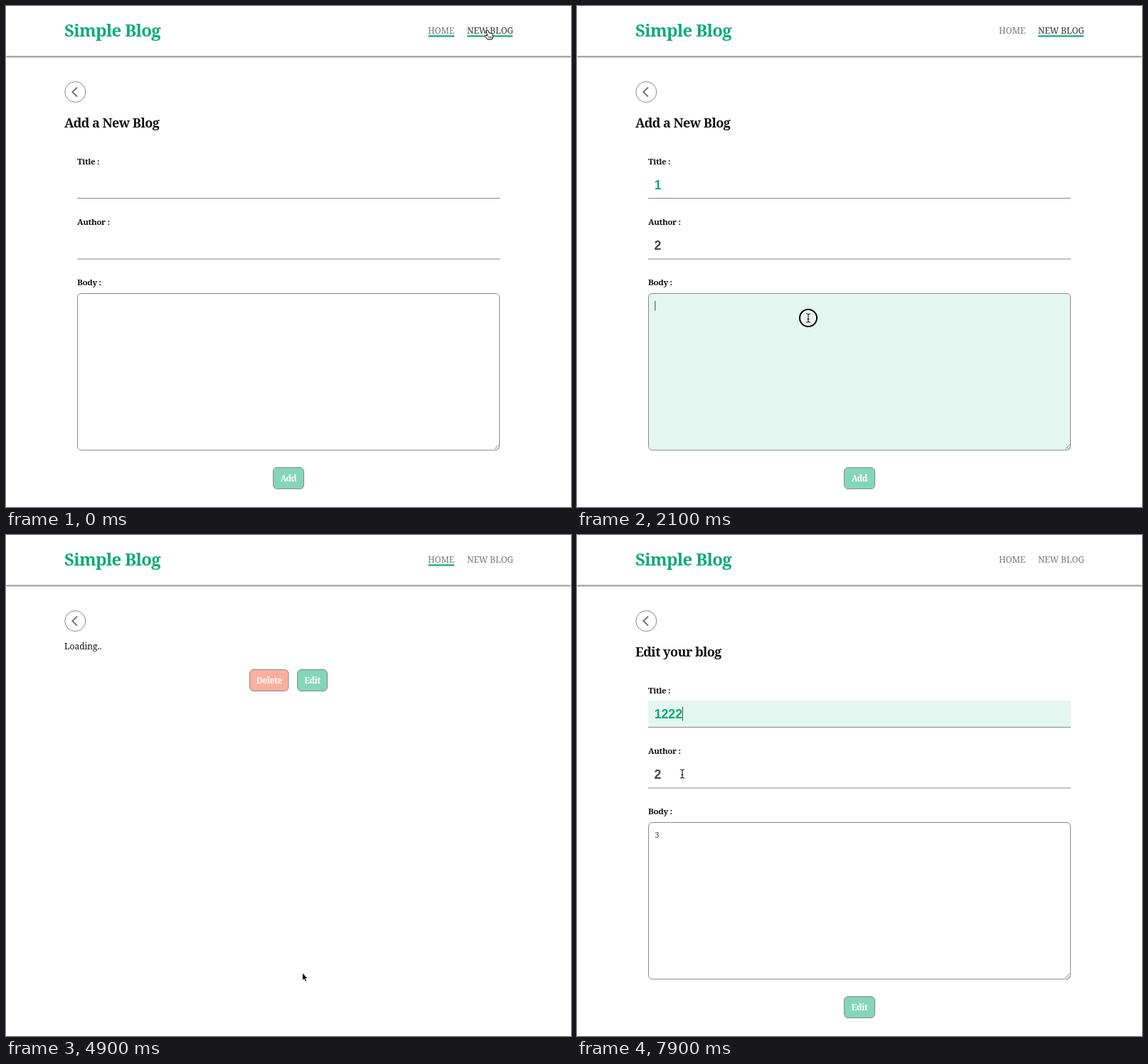
An HTML page for the animation above (8000 ms loop, 794 by 705 pixels).

```html
<!DOCTYPE html>
<html lang="en">
<head>
<meta charset="utf-8">
<title>Simple Blog</title>
<style>
  html, body { margin: 0; width: 100%; height: 100%; overflow: hidden; background: #fff; }
  svg { display: block; }
  text { font-family: 'Roboto Slab', 'Noto Serif', serif; font-size: 12px; fill: #111; white-space: pre; }
  .bold { font-weight: 700; letter-spacing: -.03em; }
  .logo { font-size: 24px; fill: #0cab75; }
  .head { font-size: 18px; }
  .label { font-size: 11.6px; }
  .nav { font-weight: 500; }
  .btn { font-size: 11.7px; fill: #fff; text-anchor: middle; }
  .input { font: 700 17.7px 'Liberation Sans', Arial, sans-serif; fill: #444; }
  .area { font-size: 10.5px; font-weight: 500; fill: #333; }
  .by { font-style: italic; fill: #777; }
  .date { font-size: 8px; fill: #777; }
  .option { font: 500 9.7px Inter, sans-serif; fill: #fff; }
  .green { fill: #0cab75; }
</style>
</head>
<body>
<script>
const LOOP = 8000;
const GREEN = '#0cab75', TINT = '#e3f6f0', LINE = '#888';
const NS = 'http://www.w3.org/2000/svg';

function el(parent, tag, attrs = {}) {
  const node = document.createElementNS(NS, tag);
  set(node, attrs);
  parent.appendChild(node);
  return node;
}
function set(node, attrs) {
  for (const key in attrs) node.setAttribute(key, attrs[key]);
}
function text(parent, x, y, cls, str) {
  const node = el(parent, 'text', { x, y, class: cls });
  node.textContent = str;
  return node;
}
function rect(parent, x, y, width, height, fill, more = {}) {
  return el(parent, 'rect', { x, y, width, height, fill, ...more });
}
function line(parent, d, stroke, width = 1) {
  return el(parent, 'path', { d, stroke, 'stroke-width': width, fill: 'none' });
}
function button(parent, x, y, w, fill, label) {
  const g = el(parent, 'g');
  const box = rect(g, x, y, w, 30, fill, { rx: 5.5, stroke: LINE });
  const caption = text(g, x + w / 2, y + 19.3, 'btn bold', label);
  return { g, box, caption };
}
function show(node, on) {
  node.style.display = on ? '' : 'none';
}

const svg = el(document.body, 'svg', { width: 794, height: 705, viewBox: '0 0 794 705' });

// Header
const header = rect(svg, 0, -10, 794, 80.5, '#fff');
header.style.filter = 'drop-shadow(0 1px 1.3px rgba(0,0,0,.75))';
text(svg, 82, 42.5, 'logo bold', 'Simple Blog');
const home = text(svg, 593, 38.5, 'nav', 'HOME');
const fresh = text(svg, 648, 38.5, 'nav', 'NEW BLOG');
const homeBar = rect(svg, 593.5, 41.3, 36.5, 2.2, GREEN);
const freshBar = rect(svg, 648, 41.3, 64, 2.2, GREEN);

// Back button
const back = el(svg, 'g');
el(back, 'circle', { cx: 97.3, cy: 121, r: 14.5, fill: '#fff', stroke: LINE });
line(back, 'M100 114.5L93.3 121L100 127.5', '#777', 2);

// Form page
const form = el(svg, 'g');
const heading = text(form, 82, 170.5, 'head bold', '');
text(form, 100, 222.7, 'label bold', 'Title :');
text(form, 100, 307.7, 'label bold', 'Author :');
text(form, 100, 393.3, 'label bold', 'Body :');
const titleBox = rect(form, 100, 233, 594, 37, '#fff');
const authorBox = rect(form, 100, 318.5, 594, 37.5, '#fff');
line(form, 'M100 270.5H694M100 356H694', LINE);
const bodyBox = rect(form, 100.5, 404.5, 593, 220.5, '#fff', { rx: 5.5, stroke: LINE });
line(form, 'M686.5 623.5L692.5 617.5M690 623.5L692.5 621', '#777', .9);
const titleText = text(form, 108.7, 257.8, 'input green', '');
const authorText = text(form, 108.4, 343, 'input', '');
const bodyText = text(form, 109.5, 425.5, 'area', '');
const caret = rect(form, 0, 0, 1, 20, '#444');
const submit = button(form, 375.5, 649.5, 43, '#84d6b9', 'Add');

// Suggestions below the author field
const menu = el(form, 'g');
rect(menu, 100, 358, 141.5, 144, '#262b2d', { rx: 2.5 })
  .style.filter = 'drop-shadow(0 1px 1.5px rgba(0,0,0,.35))';
['Tav', 'tav', 'asefd', 'Sela, Nori', 'Orlen'].forEach((name, i) =>
  text(menu, 108.7, 380.5 + i * 26.55, 'option', name));

// List page
const list = el(svg, 'g');
const cards = [['asefd', 'Tav'], ['asefd', 'Orlen'], ['asefd', 'tav'], ['1', '2']].map(([name, author], i) => {
  const y = 148.5 + i * 140;
  const box = rect(list, 83, y, 628.5, 116, '#fff', { rx: 11.5, stroke: LINE });
  text(list, 100, y + 38, 'head bold green', name);
  text(list, 101, y + 69, 'by', 'Written by ' + author);
  return box;
});

// Detail page
const detail = el(svg, 'g');
const loading = text(detail, 82, 161, '', 'Loading..');
const post = el(detail, 'g');
rect(post, 83, 148.3, 628.5, 147.2, TINT, { rx: 11.5, stroke: LINE });
text(post, 100, 186.3, 'head bold green', '1');
text(post, 101, 217.7, 'by', 'Written by 2');
text(post, 100.3, 243, 'date', '16/04/2021, 04:44:04');
text(post, 100.5, 270, '', '3');
const actions = el(detail, 'g');
button(actions, 342.5, 189.5, 54.5, '#fab09e', 'Delete');
const edit = button(actions, 409.5, 189.5, 42, '#84d6b9', 'Edit');

// Pointer and click ring
const ring = el(svg, 'g', { fill: 'none' });
const halo = el(ring, 'circle', { stroke: '#fff', 'stroke-width': 1.4 });
const hoop = el(ring, 'circle', { stroke: '#000', 'stroke-width': 2 });
const pointer = el(svg, 'g');
const shapes = { hand: el(pointer, 'g'), beam: el(pointer, 'g'), arrow: el(pointer, 'g') };
el(shapes.hand, 'path', {
  d: 'M-1.2 .3Q.4 -.8 1.1 .8L2 4Q3.2 3.3 3.9 4.4Q5.1 3.9 5.7 5.1Q7 4.9 7.2 6.4V9.4L6 13H-.2L-4 8.4Q-3.6 6.5 -1.5 7.3L-.5 8.2L-1.9 2Q-2 .8 -1.2 .3Z',
  fill: '#fff', stroke: '#000', 'stroke-width': 1, 'stroke-linejoin': 'round'
});
line(shapes.hand, 'M1.6 8.5V11.2M3.3 8.5V11.2M5 8.5V11.2', '#000', .7);
line(shapes.beam, 'M-3 -6Q0 -6 0 -4.5Q0 -6 3 -6M0 -4.5V4.5M-3 6Q0 6 0 4.5Q0 6 3 6M-1.5 1.5H1.5', '#fff', 2.4);
line(shapes.beam, 'M-3 -6Q0 -6 0 -4.5Q0 -6 3 -6M0 -4.5V4.5M-3 6Q0 6 0 4.5Q0 6 3 6M-1.5 1.5H1.5', '#111', 1.1);
el(shapes.arrow, 'path', {
  d: 'M0 0V11L2.5 8.7L4.2 12.6L6 11.8L4.4 8H7.6Z',
  fill: '#000', stroke: '#fff', 'stroke-width': .8
});

// [start, end, x, y]
const moves = [
  [0, 0, 677, 34], [500, 680, 300, 252], [1150, 1330, 309, 340], [1920, 2050, 325, 439],
  [2400, 2600, 402, 697], [2800, 3000, 401.5, 671], [3900, 4400, 416.5, 616],
  [5650, 5890, 431.5, 338], [6250, 6500, 148, 265], [7650, 7850, 148, 336]
];
const kinds = [
  [0, 'hand'], [530, 'arrow'], [630, 'beam'], [2520, 'arrow'], [2900, 'hand'], [3300, 'arrow'],
  [4050, 'hand'], [4800, 'arrow'], [5860, 'hand'], [6250, 'arrow'], [6430, 'beam']
];
const pages = [[0, 'new'], [3300, 'list'], [4800, 'detail'], [6250, 'edit']];
const focus = [
  [0, ''], [690, 'title'], [1350, 'author'], [2065, 'body'], [3020, ''], [6600, 'title']
];
const titles = [[0, ''], [1100, '1'], [7300, '12'], [7450, '122'], [7600, '1222']];
const clicks = [690, 1350, 2065, 3020, 4560, 5920, 6600];

const at = (steps, t) => steps.reduce((v, s) => (t >= s[0] ? s[1] : v), steps[0][1]);
const part = (t, a, b) => Math.min(1, Math.max(0, (t - a) / (b - a)));
const ease = k => k * k * (3 - 2 * k);

function place(t) {
  let [, , x, y] = moves[0];
  for (const [a, b, nx, ny] of moves.slice(1)) {
    const k = ease(part(t, a, b));
    x += (nx - x) * k;
    y += (ny - y) * k;
  }
  return [x, y];
}

function drawForm(t, page) {
  const field = at(focus, t);
  const title = at(titles, t);
  heading.textContent = page === 'new' ? 'Add a New Blog' : 'Edit your blog';
  titleText.textContent = title;
  authorText.textContent = t >= 1800 ? '2' : '';
  bodyText.textContent = t >= 2250 ? '3' : '';
  set(titleBox, { fill: field === 'title' ? TINT : '#fff' });
  set(authorBox, { fill: field === 'author' ? TINT : '#fff' });
  set(bodyBox, { fill: field === 'body' ? TINT : '#fff' });
  show(menu, t >= 1400 && t < 1800);
  show(caret, field !== '');
  if (field === 'title') set(caret, { x: 108.5 + title.length * 9.84, y: 241.5, height: 20 });
  if (field === 'author') set(caret, { x: t < 1800 ? 108.5 : 118.5, y: 327, height: 20 });
  if (field === 'body') set(caret, { x: t < 2250 ? 109.3 : 116, y: 415, height: 13.5 });
  const hot = t >= 2900 && t < 3300;
  set(submit.box, { fill: hot ? '#0cab75' : '#84d6b9', stroke: hot ? '#1b6f8c' : LINE, rx: hot ? 3 : 5.5 });
  submit.caption.textContent = page === 'new' ? 'Add' : 'Edit';
}

function draw(t) {
  const page = at(pages, t);
  const isForm = page === 'new' || page === 'edit';
  show(form, isForm);
  show(list, page === 'list' && t >= 3500);
  show(detail, page === 'detail');
  show(back, page !== 'list');
  if (isForm) drawForm(t, page);

  const loaded = t >= 5200;
  show(loading, !loaded);
  show(post, loaded);
  set(actions, { transform: `translate(0 ${loaded ? 130.8 : 0})` });
  set(edit.box, { fill: t >= 5860 ? GREEN : '#84d6b9' });
  set(cards[3], { fill: t >= 4050 ? TINT : '#fff' });

  home.style.fill = page === 'list' ? '#333' : '#777';
  fresh.style.fill = page === 'new' ? '#333' : '#777';
  const homeOn = 1 - ease(part(t, 500, 880)) + ease(part(t, 3300, 3720)) - ease(part(t, 4920, 5400));
  set(homeBar, { width: 36.5 * homeOn });
  set(freshBar, { width: 64 * (1 - ease(part(t, 3300, 3720))) });

  const [x, y] = place(t);
  const kind = at(kinds, t);
  for (const name in shapes) show(shapes[name], name === kind);
  set(pointer, { transform: `translate(${x} ${y})` });

  const click = clicks.find(c => t >= c && t < c + 210);
  show(ring, click !== undefined);
  if (click !== undefined) {
    const r = 9 + 12.5 * part(t, click, click + 150);
    set(ring, { transform: `translate(${x} ${y})` });
    set(hoop, { r });
    set(halo, { r: r - 1.7 });
  }
}

function tick() {
  draw(performance.now() % LOOP);
  requestAnimationFrame(tick);
}
tick();
</script>
</body>
</html>
```
